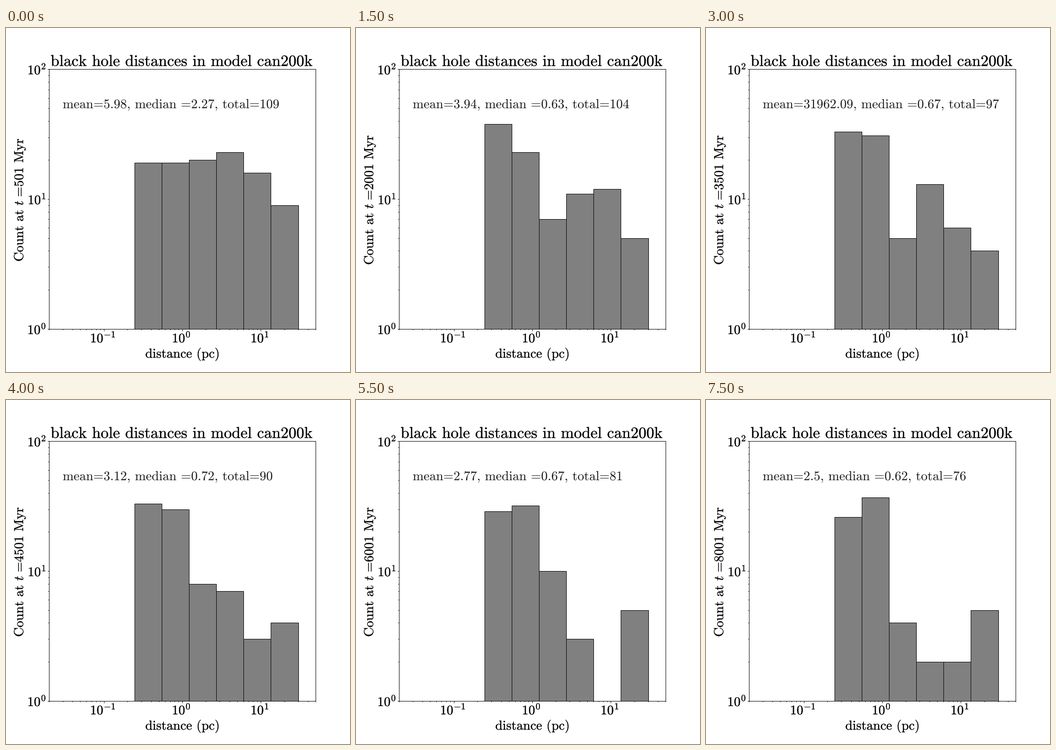
A matplotlib script for the animation above (8000 ms loop, 720 by 720 pixels).

```python
import numpy as np
import matplotlib.pyplot as plt
from matplotlib.animation import FuncAnimation
from matplotlib.patches import PathPatch
from matplotlib.textpath import TextPath
from matplotlib.transforms import Affine2D

plt.rcParams.update({
    "mathtext.fontset": "cm",
    "axes.linewidth": 1,
    "xtick.major.width": 1, "xtick.minor.width": 1,
    "ytick.major.width": 1, "ytick.minor.width": 1,
})

SIZE = 720
STEPS = 16
BODY, TITLE = 27.5, 32.9
EDGES = np.logspace(-2, np.log10(30), 11)[3:]
FLOOR = 0.05

# Key states: step -> counts per distance bin, and (mean, median, total)
KEYS = {
    0: ((0, 19, 19, 20, 23, 16, 9), (5.98, 2.27, 109)),
    2: ((4, 39, 19, 13, 11, 13, 6), (4.17, 0.72, 108)),
    4: ((0, 37, 28, 4, 11, 11, 5), (3.71, 0.54, 100)),
    6: ((0, 33, 31, 5, 13, 6, 4), (3.5, 0.67, 97)),
    9: ((0, 33, 30, 10, 5, 2, 4), (2.93, 0.74, 86)),
    11: ((0, 29, 32, 10, 3, 0, 5), (2.77, 0.67, 81)),
    15: ((0, 26, 37, 4, 2, 2, 5), (2.5, 0.62, 76)),
}
STEP_KEYS = list(KEYS)
COUNT_KEYS, STAT_KEYS = (np.array(rows, float) for rows in zip(*KEYS.values()))


def between(i, rows):
    return np.array([np.interp(i, STEP_KEYS, column) for column in rows.T])


def counts(i):
    """Whole counts, moving evenly along the log axis between key states."""
    return np.round(np.exp(between(i, np.log(np.maximum(COUNT_KEYS, FLOOR)))))


def stats_text(i):
    mean, median, total = between(i, STAT_KEYS)
    # A single far-flung hole briefly dominates the mean
    mean += np.interp(i, (4, 6, 8), (0, 31958.59, 0))
    return f"mean={round(mean, 2)}, median ={round(median, 2)}, total={total:.0f}"


fig = plt.figure(figsize=(10, 10), dpi=72, facecolor="white")

ax = fig.add_axes([0.125, 0.125, 0.775, 0.755])
ax.set_xscale("log")
ax.set_yscale("log")
bars = ax.bar(EDGES[:-1], 1, np.diff(EDGES), bottom=FLOOR, align="edge",
              color="gray", edgecolor="black", linewidth=1)
ax.set_xlim(0.02, 50)
ax.set_ylim(1, 100)
ax.tick_params(which="both", labelleft=False, labelbottom=False)

# Overlay measured in pixels, used for all lettering
stage = fig.add_axes([0, 0, 1, 1])
stage.set_xlim(0, SIZE)
stage.set_ylim(0, SIZE)
stage.axis("off")


def rm(s):
    """Upright math text with the spacing of running text."""
    s = s.replace(" ", r"\hspace{0.38}").replace(",", "{,}")
    s = s.replace("=", r"\hspace{-0.2}=\hspace{-0.2}")
    return r"\mathrm{" + s + "}"


def shape(s, x, y, size=BODY, align=0.5, angle=0):
    """Outline of a math string; align 0..1 runs along its inked width."""
    path = TextPath((0, 0), f"${s}$", size=size)
    ink = path.get_extents()
    move = Affine2D().translate(-ink.x0 - align * ink.width, 0)
    return path.transformed(move.rotate_deg(angle).translate(x, SIZE - y))


def label(path, weight=0.4, color="black"):
    return stage.add_patch(PathPatch(path, fc=color, ec=color, lw=weight))


def stats_shape(i):
    return shape(rm(stats_text(i)), 119.5, 168, align=0)


def time_shape(i):
    s = rm("Count at ") + r"t\hspace{0.12}=\hspace{-0.2}" + rm(f"{501 + 500 * i} Myr")
    return shape(s, 36, 359.8, angle=90)


label(shape(rm("black hole distances in model can200k"), 367.6, 79.6, TITLE))
label(shape(rm("distance (pc)"), 368.6, 690))
for k in (-1, 0, 1):
    x = 90 + 558 * (k - np.log10(0.02)) / np.log10(2500)
    label(shape(f"10^{{{k}}}", x - 1.7, 658))
for k in (0, 1, 2):
    label(shape(f"10^{{{k}}}", 82.3, 640.5 - 271.8 * k, align=1))

stats = label(stats_shape(0), 0, "0.1")
clock = label(time_shape(0))


def draw(i):
    for bar, n in zip(bars, counts(i)):
        bar.set_visible(n > 0)
        bar.set_height(n - FLOOR)
    stats.set_path(stats_shape(i))
    clock.set_path(time_shape(i))
    return [*bars, stats, clock]


anim = FuncAnimation(fig, draw, frames=STEPS, interval=500, repeat=True)
plt.show()
```
